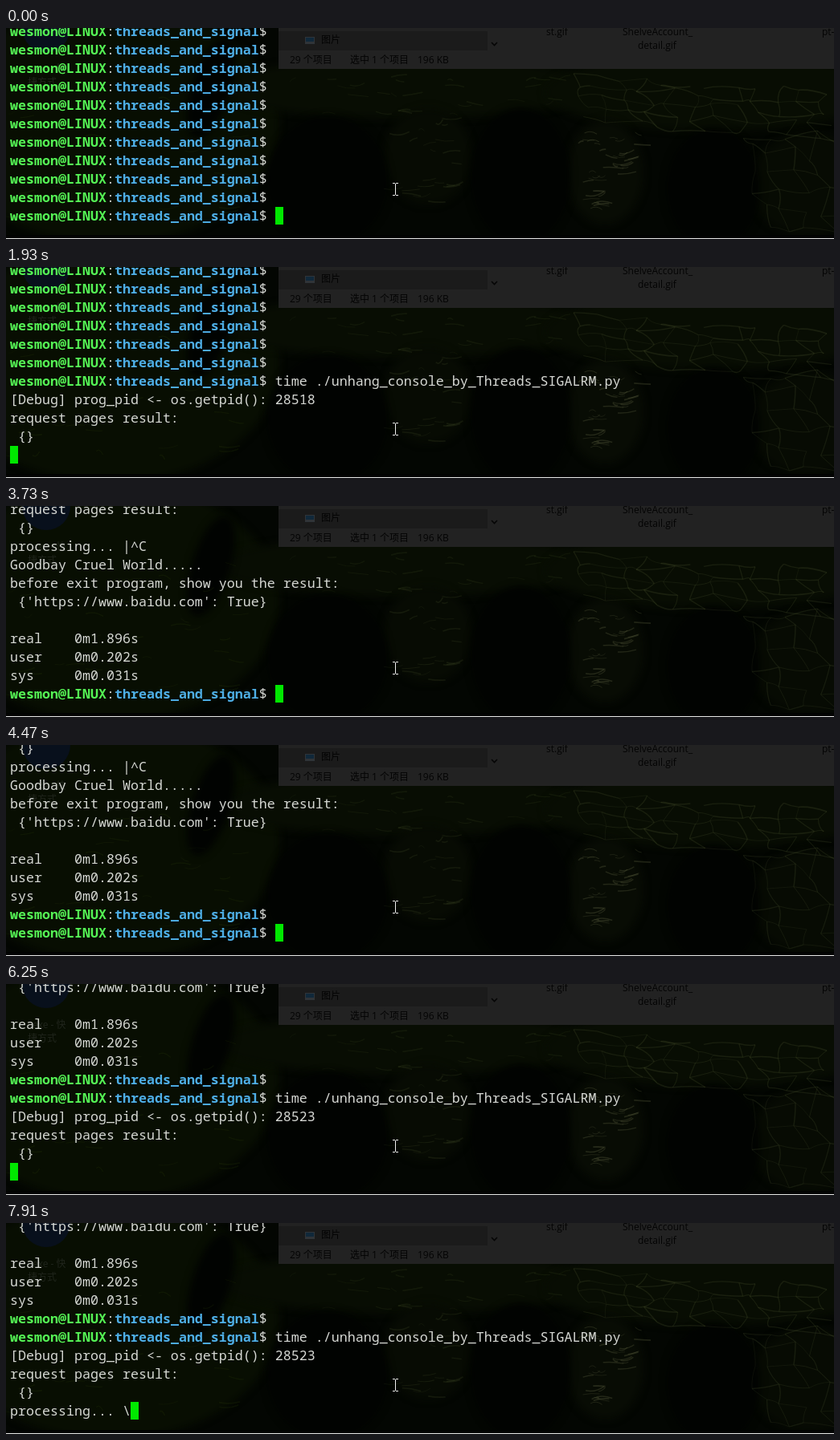
Write an HTML page with a canvas that moves like this. It is 1030 px wide and 263 px high and loops after 8000 ms.

```html
<!DOCTYPE html>
<html lang="en">
<head>
<meta charset="utf-8">
<title>Terminal session</title>
<style>
  html, body { margin: 0; width: 100%; height: 100%; overflow: hidden; background: #020502; }
  #stage { position: relative; width: 1030px; height: 263px; overflow: hidden; }
  #stage > * { position: absolute; margin: 0; }
  #screen {
    left: 5px; top: -8px; color: #d6d8d4;
    font: 16.667px/23px "Noto Sans Mono", "DejaVu Sans Mono", monospace;
    font-variant-ligatures: none;
  }
  .user { color: #55f455; font-weight: 700; }
  .path { color: #4eaee6; font-weight: 700; }
  #cursor { top: 223px; width: 10px; height: 22px; background: #00e800; }
  #pointer { left: 481px; top: 193px; }
  #edge { left: 0; top: 262px; width: 1030px; height: 1px; background: #e8e8e8; }
</style>
</head>
<body>
<div id="stage">
  <canvas id="desktop" width="1030" height="263"></canvas>
  <pre id="screen"></pre>
  <div id="cursor"></div>
  <svg id="pointer" width="7" height="16" fill="none" stroke="#f0f0f0">
    <path d="M0 .5H3M4 .5H7M3.5 1V15M0 15.5H3M4 15.5H7"/>
  </svg>
  <div id="edge"></div>
</div>
<script>
const LOOP = 8000, ROWS = 11, CELL = 10, LEFT = 5;
const $ = id => document.getElementById(id);

// --- Terminal text ---
const PROMPT = 'wesmon@LINUX:threads_and_signal$ ';
const COMMAND = PROMPT + 'time ./unhang_console_by_Threads_SIGALRM.py';
const blank = Array(10).fill(PROMPT);
const launch = pid => [
  COMMAND,
  `[Debug] prog_pid <- os.getpid(): ${pid}`,
  'request pages result:',
  ' {}'
];
const firstRun = [...blank, ...launch(28518)];
const finished = [
  ...firstRun,
  'processing... |^C',
  'Goodbay Cruel World.....',
  'before exit program, show you the result:',
  " {'https://www.baidu.com': True}",
  '',
  'real    0m1.896s',
  'user    0m0.202s',
  'sys     0m0.031s'
];
const again = [...finished, PROMPT];
const secondRun = [...again, ...launch(28523)];

// Each step: start time, lines above the cursor, line holding the cursor
const spin = (lines, times) =>
  times.map((time, i) => [time, lines, 'processing... ' + '|/-\\'[i % 4]]);
const steps = [
  [0, blank, PROMPT],
  [680, blank, COMMAND],
  [1930, firstRun, ''],
  ...spin(firstRun, [2080, 2360, 2480, 2760, 2910, 3050, 3300, 3450]),
  [3730, finished, PROMPT],
  [4470, again, PROMPT],
  [5000, again, COMMAND],
  [6250, secondRun, ''],
  ...spin(secondRun, [6530, 6650, 6930, 7080, 7200, 7480, 7630, 7910])
];

function markup(line) {
  const safe = line.replace(/&/g, '&amp;').replace(/</g, '&lt;');
  return safe.replace(/^(\w+@LINUX):(\w+)\$/,
    '<span class="user">$1</span>:<span class="path">$2</span>$');
}

let shown = null;
function frame() {
  const time = performance.now() % LOOP;
  const step = steps.findLast(s => s[0] <= time);
  if (step !== shown) {
    const [, lines, last] = shown = step;
    $('screen').innerHTML = [...lines, last].slice(-ROWS).map(markup).join('\n');
    $('cursor').style.left = LEFT + last.length * CELL + 'px';
  }
  $('pointer').style.top = (time < 530 ? 193 : 194) + 'px';
  requestAnimationFrame(frame);
}

// --- Dim desktop seen through the terminal ---
const ctx = $('desktop').getContext('2d');
let seed = 7;
const random = () => (seed = (seed * 16807) % 2147483647) / 2147483647;
const jitter = size => (random() - 0.5) * size;

function box(color, x, y, w, h) {
  ctx.fillStyle = color;
  ctx.fillRect(x, y, w, h);
}

function blob(color, x, y, rx, ry, tilt = 0) {
  ctx.fillStyle = color;
  ctx.beginPath();
  ctx.ellipse(x, y, rx, ry, tilt, 0, 7);
  ctx.fill();
}

function label(text, x, y, color) {
  ctx.fillStyle = color;
  ctx.fillText(text, x, y);
}

// Light net on water: a jittered grid joined by soft curves
function net(x, y, w, h, cols, rows, color) {
  const dx = w / cols, dy = h / rows, points = [];
  for (let r = 0; r <= rows; r++)
    for (let c = 0; c <= cols; c++)
      points.push([x + c * dx + r * 5 + jitter(dx * 0.8), y + r * dy + c * 2 + jitter(dy * 0.8)]);
  const join = (a, b) => {
    if (random() < 0.15) return;
    ctx.lineWidth = 0.6 + random();
    ctx.beginPath();
    ctx.moveTo(...a);
    ctx.quadraticCurveTo((a[0] + b[0]) / 2 + jitter(10), (a[1] + b[1]) / 2 + jitter(8), ...b);
    ctx.stroke();
  };
  ctx.strokeStyle = color;
  points.forEach((p, i) => {
    if (i % (cols + 1) < cols) join(p, points[i + 1]);
    if (points[i + cols + 1]) join(p, points[i + cols + 1]);
  });
}

// Short, almost level glints scattered over an area
function glints(x, y, w, h, count, color) {
  ctx.strokeStyle = color;
  for (let i = 0; i < count; i++) {
    const gx = x + random() * w, gy = y + random() * h, length = 6 + random() * 20;
    ctx.lineWidth = 0.6 + random() * 1.2;
    ctx.beginPath();
    ctx.moveTo(gx, gy);
    ctx.quadraticCurveTo(gx + length / 2, gy + jitter(10), gx + length, gy + jitter(10));
    ctx.stroke();
  }
}

function paintDesktop() {
  box('#030602', 0, 0, 1030, 263);
  ctx.filter = 'blur(5px)';
  blob('#080e02', 130, 120, 210, 150);
  blob('#080d03', 500, 75, 240, 38);
  blob('#080d03', 880, 80, 210, 48);
  blob('#070b03', 525, 160, 55, 60);
  blob('#080c04', 745, 180, 48, 65);
  blob('#070b03', 1000, 195, 75, 65);
  blob('#010301', 255, 75, 24, 65, 0.3);
  blob('#010301', 400, 190, 75, 80);
  blob('#010301', 640, 185, 62, 85);
  blob('#010301', 880, 200, 58, 75);
  ctx.filter = 'none';
  glints(0, 60, 300, 190, 34, 'rgba(70,90,25,.13)');
  glints(340, 60, 350, 50, 26, 'rgba(80,92,45,.15)');
  glints(470, 100, 90, 120, 24, 'rgba(90,100,55,.18)');
  glints(708, 128, 75, 55, 22, 'rgba(120,125,85,.24)');
  glints(715, 180, 22, 55, 14, 'rgba(120,125,85,.26)');
  net(705, 58, 310, 58, 11, 4, 'rgba(100,110,65,.19)');
  net(920, 130, 110, 115, 4, 5, 'rgba(100,110,65,.18)');

  ctx.font = '12px "Open Sans", "Noto Sans CJK SC", "Noto Sans CJK", sans-serif';
  blob('#08101c', 50, 0, 30, 30);
  label('.exe - 快', 30, 55, '#20251c');
  label('捷方式', 27, 72, '#20251c');

  box('#222', 339, 0, 691, 51);
  box('#1b1b1b', 339, 4, 260, 24);
  box('#303438', 372, 11, 12, 9);
  box('#10283a', 373, 12, 10, 5);
  ctx.strokeStyle = '#050505';
  ctx.lineWidth = 1.6;
  ctx.stroke(new Path2D('M604 18l3.5 3.5 3.5-3.5'));
  const ink = '#040404';
  label('图片', 392, 19, ink);
  label('29 个项目', 353, 44, ink);
  label('选中 1 个项目', 428, 44, ink);
  label('196 KB', 512, 44, ink);
  label('st.gif', 672, 9, ink);
  label('ShelveAccount_', 767, 9, ink);
  label('detail.gif', 786, 26, ink);
  label('pt-', 1015, 9, ink);
  box('#010201', 0, 258, 1030, 4);
}

paintDesktop();
frame();
</script>
</body>
</html>
```
